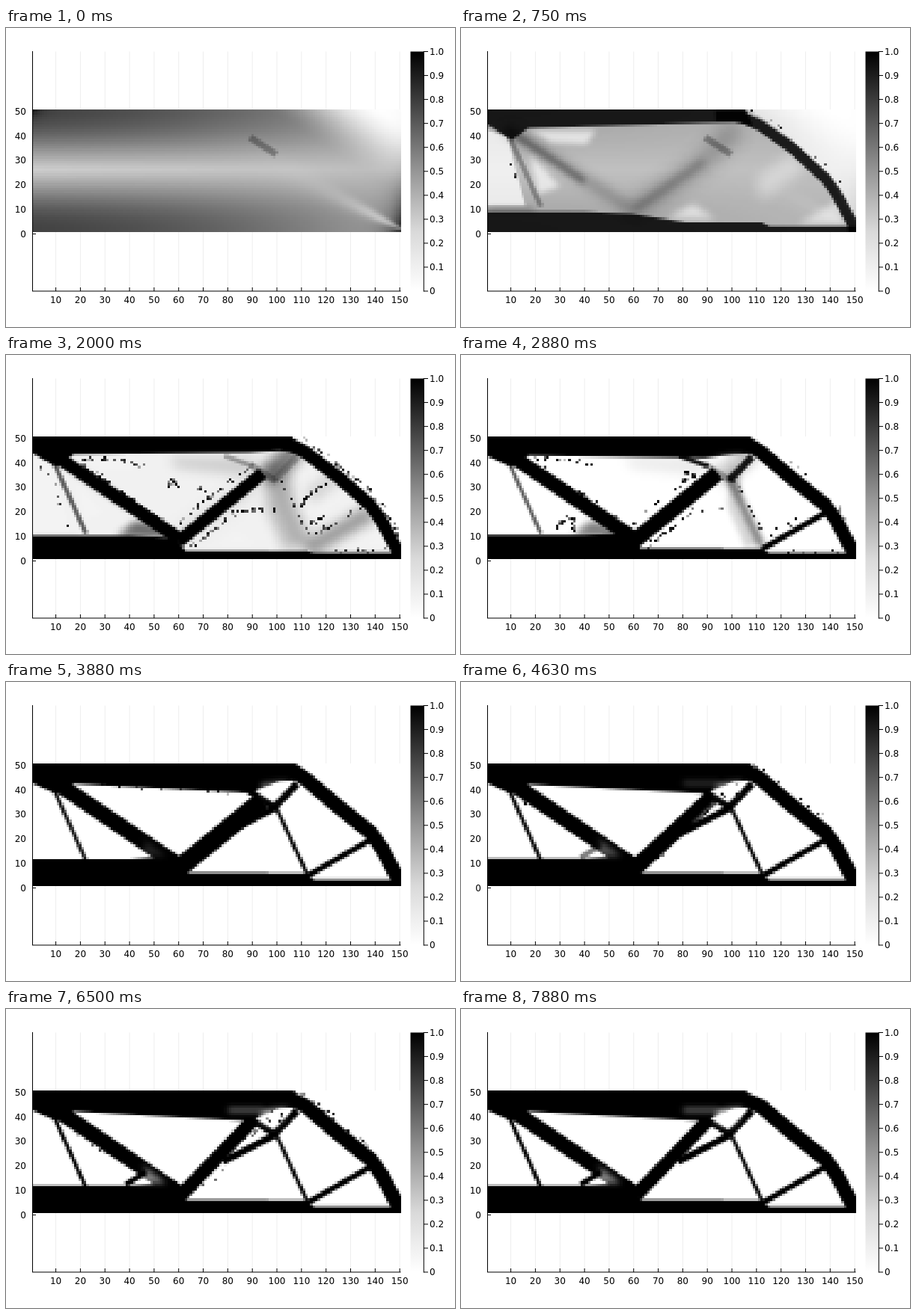
These frames come from a looping animation (600 px wide and 400 px high, 8000 ms). An HTML page with a canvas:

```html
<!DOCTYPE html>
<html lang="en">
<head>
<meta charset="utf-8">
<title>Beam density</title>
<style>
html, body { margin: 0; width: 100%; height: 100%; overflow: hidden; background: #fff; }
canvas { position: absolute; left: 35px; top: 109px; width: 493px; height: 164px; image-rendering: pixelated; }
svg { position: absolute; left: 0; top: 0; }
text { font: 12px "DejaVu Sans", sans-serif; }
</style>
</head>
<body>
<canvas id="heat" width="150" height="50"></canvas>
<svg id="axes" width="600" height="400">
  <defs>
    <linearGradient id="ramp" x2="0" y2="1">
      <stop/>
      <stop offset=".125" stop-color="#252525"/>
      <stop offset=".5" stop-color="#969696"/>
      <stop offset=".75" stop-color="#d9d9d9"/>
      <stop offset="1" stop-color="#fff"/>
    </linearGradient>
  </defs>
  <rect x="540.5" y="31.5" width="18" height="320.5" fill="url(#ramp)"/>
</svg>
<script>
const NS = 'http://www.w3.org/2000/svg';
const W = 150, H = 50, X0 = 35, Y0 = 109, CX = 493 / W, CY = 164 / H;
const STEP = 125, STEPS = 64;

// ---- axes ----
const axes = document.getElementById('axes');
function add(tag, attrs, text = '') {
  const el = document.createElementNS(NS, tag);
  for (const k in attrs) el.setAttribute(k, attrs[k]);
  el.textContent = text;
  axes.append(el);
}
const rule = (d, stroke = '#000') => add('path', { d, stroke, fill: 'none' });
const label = (x, y, anchor, text) => add('text', { x, y: y + 4.4, 'text-anchor': anchor }, text);

for (let i = 10; i <= 150; i += 10) {
  const x = 35.4 + (i - .5) * 3.2827;
  rule(`M${x} 31.5V109M${x} 273V352`, 'rgba(0,0,0,.07)');
  rule(`M${x} 352V347`);
  label(x, 363.5, 'middle', i);
}
for (let i = 0; i <= 50; i += 10) label(27, 275.3 - i * 3.28, 'end', i);
rule('M35.5 31V352M35 352H527.5M35 275.5H40');
rule('M558.3 31V352.5');
for (let i = 0; i <= 10; i++) {
  const y = 352 - i * 32.05;
  rule(`M558 ${y}H564`);
  label(566, y, 'start', i % 10 ? '0.' + i : i ? '1.0' : '0');
}

// ---- drawing helpers: stage coordinates on a 150 x 50 grid ----
const c = document.getElementById('heat').getContext('2d');
c.setTransform(1 / CX, 0, 0, 1 / CY, -X0 / CX, -Y0 / CY);
c.lineJoin = 'round';
c.imageSmoothingEnabled = false;

let step = 0, seed = 1;

// Value at the current step, linear between (step, value) pairs
function at(...keys) {
  for (let i = 0; i < keys.length; i += 2) {
    if (step > keys[i]) continue;
    if (!i) return keys[1];
    const t = (step - keys[i - 2]) / (keys[i] - keys[i - 2]);
    return keys[i - 1] + t * (keys[i + 1] - keys[i - 1]);
  }
  return keys[keys.length - 1];
}

function pen(alpha, blur, color) {
  c.globalAlpha = alpha;
  c.filter = blur ? `blur(${blur}px)` : 'none';
  c.fillStyle = c.strokeStyle = color;
}
function fill(d, alpha = 1, blur = .6, color = '#000') {
  pen(alpha, blur, color);
  c.fill(new Path2D(d));
}
function line(d, width, alpha = 1, blur = .6) {
  pen(alpha, blur, '#000');
  c.lineWidth = width;
  c.stroke(new Path2D(d));
}

function rand() {
  seed = (seed * 1664525 + 1013904223) % 4294967296;
  return seed / 4294967296;
}
// Single cells scattered along a path
function dots(d, count, spread = 3) {
  const path = document.createElementNS(NS, 'path');
  path.setAttribute('d', d);
  const len = path.getTotalLength();
  const snap = (v, from, size) => from + Math.floor((v + (rand() - .5) * spread - from) / size) * size;
  for (let i = 0; i < Math.round(count); i++) {
    const p = path.getPointAtLength(rand() * len);
    pen(.2 + .8 * rand(), 0, '#000');
    c.fillRect(snap(p.x, X0, CX), snap(p.y, Y0, CY), CX, CY);
  }
}

// ---- first density: bending stress with local effects at the corners ----
const smooth = (v, a, b) => {
  const t = Math.min(1, Math.max(0, (v - a) / (b - a)));
  return t * t * (3 - 2 * t);
};
function stressAt(x, y) {
  const u = x / W, dx = W - x;
  const edge = .74 - .1 * u - .3 * u * u, middle = .2 + .06 * u;
  const bend = Math.sin(Math.PI / 2 * Math.min(1, Math.abs(y - 26) / 25)) ** 1.2;
  const fade = smooth(dx / 30 + (H - y) / 20, .2, 1.8);
  const off = (y - 3.5 - .5 * (dx - 3)) / (1 + .12 * dx);
  const streak = .95 * Math.exp(-off * off - dx / 16);
  const support = .6 * Math.exp(-dx / 5 - y / 14);
  const load = .25 * Math.exp(-x / 3 - (H - y) / 2.5);
  return (middle + (edge - middle) * bend) * fade * (1 - streak) + support + load;
}
const stress = document.createElement('canvas');
stress.width = W;
stress.height = H;
const s = stress.getContext('2d');
for (let x = 0; x < W; x++) {
  for (let y = 0; y < H; y++) {
    s.globalAlpha = Math.min(1, stressAt(x + 1, H - y));
    s.fillRect(x, y, 1, 1);
  }
}

// Grey web between the chords that soon dissolves
function web() {
  const a = at(0, 0, 8, 1, 12, 1, 17, 0);
  fill('M35 100H365L400 119 441 148 492 200 527 262V280H35Z', .27 * a, .6);
  fill('M20 130L62 146 86 238H20Z', a, .5, '#fff');
  fill('M92 168L132 212 103 222Z', .85 * a, 1.3, '#fff');
  fill('M92 137H180L168 156 120 153Z', .85 * a, 1.2, '#fff');
  fill('M275 255L310 235 340 256Z', .8 * a, 1.8, '#fff');
  fill('M395 200L445 165 460 190 400 230Z', .5 * a, 2.5, '#fff');
  fill('M450 262L505 230 512 262Z', .7 * a, 1.5, '#fff');
  line('M228 247L330 175 368 132', 24, .3 * a, 3);
  line('M232 243L325 178', 11, .3 * a, 1.8);
  line('M36 243H98', 7, .3 * a, .8);
}

// Soft patches while the members condense
function haze() {
  fill('M218 136H335L320 162 228 152Z', at(9, 0, 16, .14, 23, .08, 29, 0), 2);
  line('M366 150L364 200 388 256', at(16, 34, 23, 16), at(8, 0, 16, .2, 23, .16, 29, 0), at(16, 2, 23, 1));
  line('M405 190L445 160', 20, at(9, 0, 16, .12, 20, 0), 2);
  line('M345 165L388 128', 26, at(9, 0, 16, .5, 23, .3, 31, 0), 2);
  fill('M148 243L172 222 205 226 225 246Z', at(10, 0, 16, .55, 23, .5, 29, 0), 1.5);
}

function chords() {
  const a = at(0, 0, 7, 1);
  const bulge = at(12, 1, 16, .7, 24, 0);
  const shoulder = at(12, 372, 24, 384, 31, 384, 63, 374);
  fill(`M20 90H${shoulder}L390 131 365 ${at(12, 126, 16, 128, 23, 133)} 325 ${at(12, 127, 16, 130, 23, 138, 31, 148, 43, 150)}
    90 ${at(12, 134, 16, 133, 31, 136, 43, 137)} 68 150 35 ${at(12, 129, 16, 131, 23, 135)} 20 125Z`, a);
  line(`M340 118L${shoulder} ${119 - 2 * bulge} 401 ${130 + bulge} 443 ${166 - 5 * bulge} 487 201 502 222 523 262 526 280`,
    at(12, 14.5, 16, 17, 23, 18.5, 31, 19.5), a, .5);
  const left = at(12, 246, 16, 242, 23, 241, 31, 237, 43, 236), right = at(12, 260, 16, 262, 23, 259, 31, 256);
  fill(`M20 ${left}H165L228 ${at(12, 248, 16, 245, 31, 232)} ${at(12, 300, 16, 240)} ${right}H402L412 266H540V290H20Z`, a);
  line('M408 264H516', 3, at(12, 0, 16, .35), .4);
  line(`M240 ${right - 1}H350`, 3, at(15, 0, 20, .35, 43, .2));
}

function members() {
  const main = at(12, 134, 16, 131, 23, 130);
  line(`M60 ${main}L232 246`, at(0, 12, 12, 14, 16, 17, 23, 19, 31, 21, 63, 20), at(0, 0, 12, .5, 16, 1), at(12, 2, 16, .6));
  line(`M60 ${main}L165 ${main + 71}`, 9, at(2, 0, 12, .9), 1.1);
  line('M64 144L107 239', at(12, 7, 23, 5), at(0, 0, 12, .6, 23, .62, 31, .9, 43, 1));

  const split = at(31, 0, 43, 1);
  line(`M${230 + 3 * split} 250L${343 - 12 * split} ${158 - 10 * split}`, at(16, 17, 23, 21, 31, 25, 43, 18), at(11, 0, 16, 1), at(12, 2, 16, .6));
  line('M290 204L360 168', 9, at(23, 0, 31, 1));
  line('M358 168L389 136', 10, at(12, 0, 16, .2, 23, .9, 31, 1));
  line('M326 146L361 169', 9, at(23, .3, 31, 1));
  line('M292 135L330 149', 6, at(14, 0, 16, .3, 23, .9));

  line('M360 166L402 256', at(16, 26, 23, 10, 31, 5), at(12, 0, 16, .1, 23, .5, 31, .95), at(16, 2, 23, 1, 31, .6));
  line('M402 260L489 210', at(16, 22, 23, 8, 31, 7.5), at(8, 0, 12, .15, 16, .36, 23, 1), at(16, 2, 23, .6));
}

// Joints that open up late
function joints() {
  fill('M342 135L376 132 373 144 358 159 340 150Z', at(16, 0, 23, .35, 31, .4, 43, .6, 63, .95), .8, '#fff');
  fill('M307 189L337 160 350 167Z', at(31, 0, 43, .55, 63, .92), .7, '#fff');
  line('M297 135L344 134', 6, at(31, 0, 43, .5), .8);
  fill('M297 132H344V138H297Z', at(31, 0, 43, .4), .8, '#fff');
  fill('M182 208L214 233H170L188 219Z', at(23, 0, 31, .12, 43, .5), 1, '#fff');
  line('M160 235L187 218', 7, at(31, 0, 43, 1));
}

function specks() {
  const early = at(9, 0, 16, 1, 23, .6, 28, 0);
  const late = at(35, 0, 43, 1, 50, .6, 60, 0);
  dots('M380 108L402 115 445 148 480 175 506 205 525 240', at(5, 0, 12, 52, 23, 8, 31, 0), 4);
  dots('M42 148L62 165 75 208 86 239', at(5, 0, 12, 18, 20, 0), 4);
  dots('M98 138L140 139 188 149M100 145L150 179 211 221', 60 * early, 6);
  dots('M230 224L275 188 322 152M248 257L285 229 310 208 360 207', 70 * early, 4);
  dots('M395 204L398 192 430 170M408 225L428 214', at(12, 0, 16, 40, 20, 0));
  dots('M215 180L220 166 232 180M255 178L268 183', at(12, 0, 16, 20, 20, 0), 4);
  dots('M412 240L480 202M366 168L405 240M432 262H515', 40 * early, 5);
  dots('M126 233L136 220 150 218 150 235M298 172V157H312V172', at(18, 0, 23, 45, 27, 0), 4);
  dots('M105 138L190 143 300 148', at(23, 0, 31, 10, 38, 0), 4);
  dots('M348 138H368V151H348ZM312 184L335 164', 28 * late, 5);
  dots('M368 111L398 113 412 124 460 162 490 186', 34 * late, 4);
  dots('M78 158L125 186 178 219M238 254L300 210', 34 * late, 4);
}

function draw() {
  seed = step * 7919 + 17;
  fill('M0 0H600V400H0Z', 1, 0, '#fff');
  pen(at(0, 1, 8, 0), 0, '#000');
  c.drawImage(stress, X0, Y0, 493, 164);
  web();
  haze();
  chords();
  members();
  joints();
  specks();
}

let shown = -1;
const origin = performance.now();
function tick() {
  step = Math.floor((performance.now() - origin) / STEP) % STEPS;
  if (step !== shown) {
    shown = step;
    draw();
  }
  requestAnimationFrame(tick);
}
tick();
</script>
</body>
</html>
```
